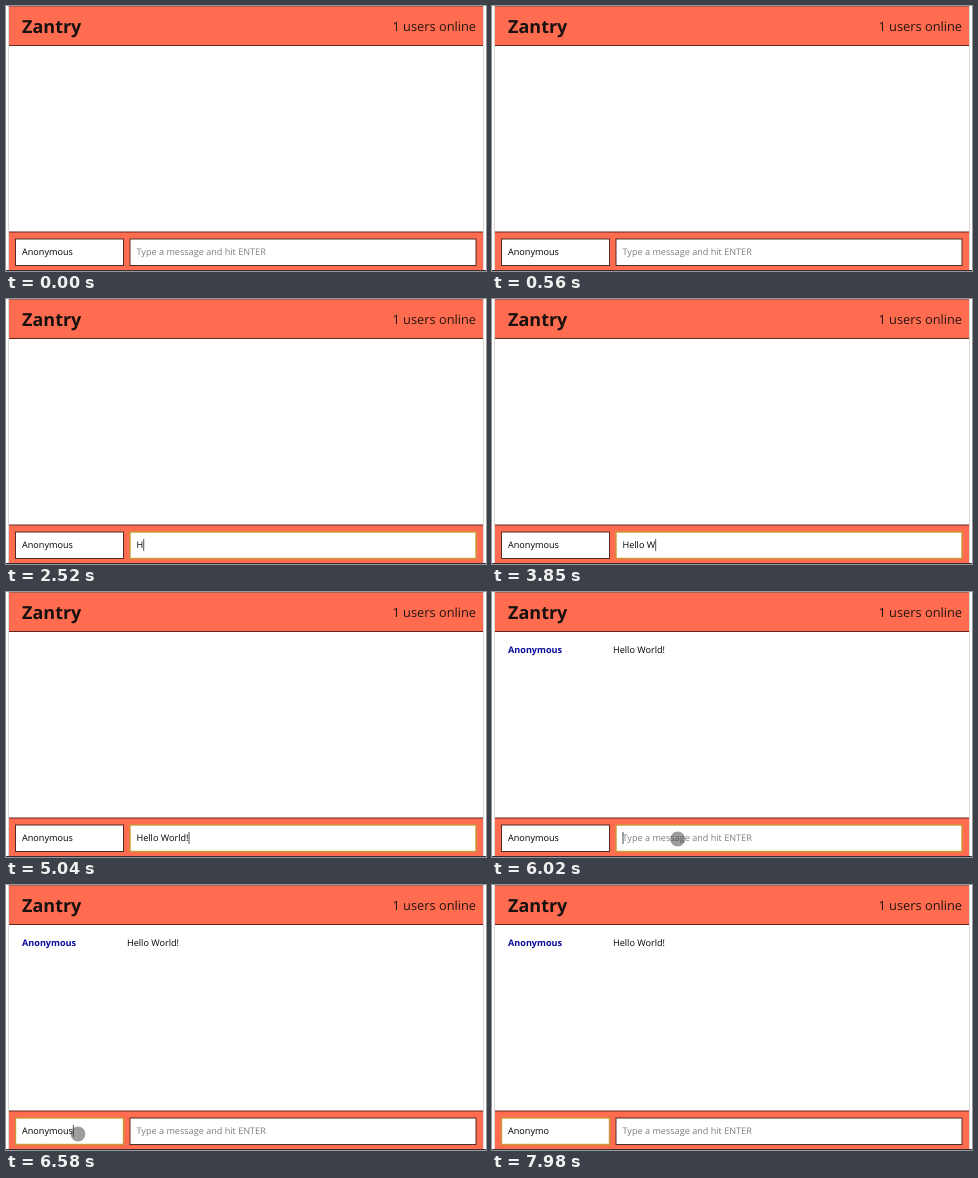
Recreate the animation shown at these times as an HTML page. Size 480 by 265 pixels, loop 8000 ms.

```html
<!DOCTYPE html>
<html lang="en">
<head>
<meta charset="utf-8">
<title>Chat demo</title>
<style>
  html, body { margin: 0; width: 100%; height: 100%; overflow: hidden; background: #fff; }
  svg { display: block; width: 480px; height: 265px; }
  text { font: 9.1px "Open Sans", sans-serif; white-space: pre; text-rendering: geometricPrecision; }
  .title { font-size: 18px; font-weight: 700; fill: #17110f; }
  .online { font-size: 12.8px; fill: #241512; }
  .author { font-weight: 700; fill: #0a0a9c; }
  .hint { fill: #7d7d7d; }
  .bar { fill: #ff6c50; }
  .rule { stroke: #60271d; }
  .field { fill: #fff; stroke: #542a23; }
  .field.focus { stroke: #c89a35; stroke-width: 1.4; }
  .edge { stroke: #d9d9d9; }
</style>
</head>
<body>
<svg viewBox="0 0 480 265">
  <rect width="480" height="265" fill="#fff"/>
  <path class="edge" d="M2.5 0V265M477.5 0V265"/>
  <rect class="bar" x="3" width="474" height="40"/>
  <rect class="bar" x="3" y="226" width="474" height="38"/>
  <path class="rule" d="M3 39.5H477M3 226H477"/>
  <path d="M3 .4H477" stroke="#8d5c55" stroke-width=".8"/>
  <path d="M0 264.5H480" stroke="#3a2b30"/>
  <text class="title" x="16" y="26.5">Zantry</text>
  <text class="online" x="470" y="24.5" text-anchor="end">1 users online</text>
  <g id="post">
    <text class="author" x="16" y="60.5">Anonymous</text>
    <text x="121" y="60.5">Hello World!</text>
  </g>
  <rect id="nameBox" class="field" x="9.5" y="233" width="108" height="26.5"/>
  <rect id="messageBox" class="field" x="124" y="233" width="346" height="26.5"/>
  <text id="name" x="16" y="249.3"></text>
  <text id="hint" class="hint" x="130.5" y="249.3">Type a message and hit ENTER</text>
  <text id="message" x="130.5" y="249.3"></text>
  <path id="caret" d="M.5 240V252" stroke="#222" stroke-width=".8"/>
  <circle id="dot" r="7.4" fill="#444" fill-opacity=".52"/>
  <path id="arrow" d="M0 0V10.2L2.3 8.1L4.1 11.8L5.9 11L4.2 7.4H7.2Z" fill="#000" stroke="#fff" stroke-width=".7"/>
</svg>
<script>
const LOOP = 8000;
const GREETING = "Hello World!";
const KEY_TIMES = [2520, 2660, 2870, 3010, 3220, 3430, 3850, 3990, 4130, 4340, 4550, 5040];
const FOCUS = 2170, SEND = 5530, SWITCH = 6440, ERASE = [6860, 7350];
const BLINK = 530;

const arrowPath = [[1260, 330, 267], [1400, 296, 258], [1610, 258, 246], [1820, 256, 245]];
const dotPath = [[5810, 258, 248], [5880, 243, 247], [6020, 186, 247], [6230, 112, 248], [6440, 74, 249], [6580, 72, 249]];

const el = id => document.getElementById(id);
const show = (id, on) => el(id).setAttribute("visibility", on ? "visible" : "hidden");
const place = (id, [x, y]) => el(id).setAttribute("transform", `translate(${x} ${y})`);
const within = (t, from, to) => t >= from && t < to;

function along(path, t) {
  if (t <= path[0][0]) return path[0].slice(1);
  for (let i = 1; i < path.length; i++) {
    const [t0, x0, y0] = path[i - 1], [t1, x1, y1] = path[i];
    if (t <= t1) {
      const p = (t - t0) / (t1 - t0);
      return [x0 + (x1 - x0) * p, y0 + (y1 - y0) * p];
    }
  }
  return path[path.length - 1].slice(1);
}

function drawCaret(t, input) {
  const lastAction = [FOCUS, ...KEY_TIMES, SEND, SWITCH, ...ERASE].filter(a => a <= t).pop();
  const lit = lastAction !== undefined && Math.floor((t - lastAction) / BLINK) % 2 === 0;
  show("caret", lit);
  const start = Number(input.getAttribute("x"));
  place("caret", [start + (input.textContent ? input.getComputedTextLength() : 0), 0]);
}

function draw(t) {
  const typed = t < SEND ? KEY_TIMES.filter(k => k <= t).length : 0;
  const erased = ERASE.filter(k => k <= t).length;
  const onName = t >= SWITCH;

  el("message").textContent = GREETING.slice(0, typed);
  el("name").textContent = "Anonymous".slice(0, 9 - erased);
  show("hint", !typed);
  show("post", t >= SEND);
  el("messageBox").classList.toggle("focus", within(t, FOCUS, SWITCH));
  el("nameBox").classList.toggle("focus", onName);
  drawCaret(t, el(onName ? "name" : "message"));

  show("arrow", within(t, 1260, FOCUS));
  place("arrow", along(arrowPath, t));
  const clicking = within(t, FOCUS, 2310);
  show("dot", clicking || within(t, 5810, ERASE[0]));
  place("dot", clicking ? [258, 248] : along(dotPath, t));
}

const start = performance.now();
function tick() {
  draw((performance.now() - start) % LOOP);
  requestAnimationFrame(tick);
}
tick();
</script>
</body>
</html>
```
